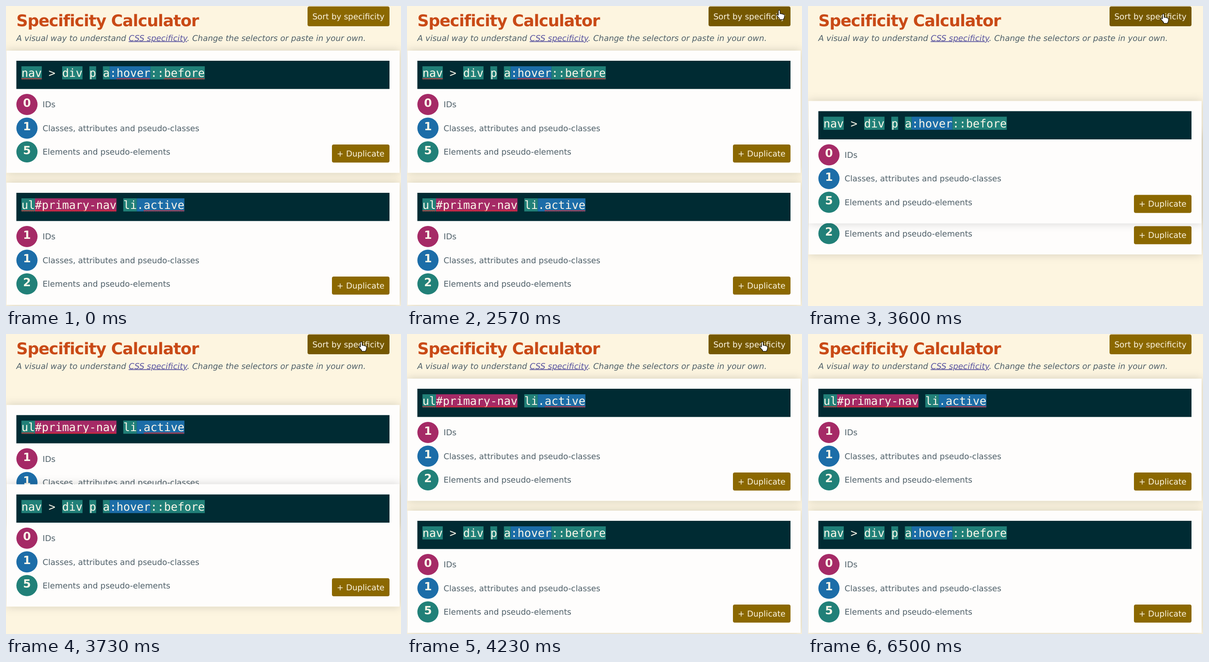
Write an HTML page that moves like this. It is 858x652 px and loops after 6.53 s.

```html
<!DOCTYPE html>
<html lang="en">
<head>
<meta charset="utf-8">
<title>Specificity Calculator</title>
<style>
html, body { margin: 0; width: 100%; height: 100%; overflow: hidden; background: #fdf5e0; }
svg { display: block; }
text { font: 17.5px "DejaVu Sans", sans-serif; fill: #4e5f68; text-rendering: geometricPrecision; white-space: pre; }
.title { font-size: 35px; font-weight: bold; letter-spacing: -.03em; fill: #c94a16; }
.intro { font-style: italic; }
.link { fill: #5a55a0; text-decoration: underline; text-decoration-thickness: 1px; }
.code { font: 24.5px "DejaVu Sans Mono", monospace; fill: #fdf8ea; }
.count { font-size: 24.5px; font-weight: bold; text-anchor: middle; fill: #fdf8ea; }
.button { fill: #8b6800; }
.label { fill: #fdf6e3; }
.squiggle { fill: none; stroke: #e0282c; stroke-width: 1.1; }
</style>
</head>
<body>
<svg width="858" height="652" viewBox="0 0 858 652">
  <defs>
    <filter id="shadow" filterUnits="userSpaceOnUse" x="-50" y="-50" width="960" height="370">
      <feDropShadow dx="0" dy="0" stdDeviation="9.5" flood-color="#30281a" flood-opacity=".17"/>
    </filter>
  </defs>
  <text class="title" x="22.5" y="44">Specificity Calculator</text>
  <text class="intro" x="22.5" y="75.5">A visual way to understand <tspan class="link">CSS specificity</tspan>. Change the selectors or paste in your own.</text>
  <g id="cards"></g>
  <rect id="sort" class="button" x="655" y="1" width="178" height="43" rx="4"/>
  <text class="label" x="665.5" y="28.5">Sort by specificity</text>
  <path id="hand" fill="#fff" stroke="#111" stroke-width="1.2" stroke-linejoin="round"
    d="M-2 1.5Q-2 0 -.2 0Q1.6 0 1.6 1.7V8Q3.2 6.6 4.9 8.3Q6.6 7.4 8 9.2Q11 8.8 11 11.5V14.5Q11 17 9.3 18.5V20.5H.5V18.5Q-2.5 15.5 -5.4 11.6Q-6 9.7 -4.3 9.4Q-3.2 9.5 -2 11.2Z"/>
</svg>
<script>
const LOOP = 6530, TOP = 97, STEP = 287, CHAR = 24.5 * 1233 / 2048;
const MAGENTA = '#a52a66', BLUE = '#1c6da8', GREEN = '#218078';
const $ = id => document.getElementById(id);

const rect = (x, y, w, h, fill, extra = '') =>
  `<rect x="${x}" y="${y}" width="${w}" height="${h}" fill="${fill}" ${extra}/>`;
const text = (cls, x, y, s) => `<text class="${cls}" x="${x}" y="${y}">${s}</text>`;

function squiggle([from, to]) {
  let d = '';
  for (let x = 33.5 + from * CHAR, i = 0; x < 33.5 + to * CHAR; x += 2, i++)
    d += `${i ? 'L' : 'M'}${x} ${i % 2 ? 62 : 60}`;
  return `<path class="squiggle" d="${d}"/>`;
}

// parts: [text, highlight colour]; typos: character ranges
function card(id, parts, counts, typos) {
  let x = 33.5, marks = '';
  for (const [s, color] of parts) {
    if (color) marks += rect(x, 34, s.length * CHAR, 28.5, color);
    x += s.length * CHAR;
  }
  const selector = parts.map(p => p[0]).join('').replace('>', '&gt;');
  const names = ['IDs', 'Classes, attributes and pseudo-classes', 'Elements and pseudo-elements'];
  const rows = names.map((name, i) => {
    const y = 117 + i * 51.5;
    return `<circle cx="45.5" cy="${y}" r="23" fill="${[MAGENTA, BLUE, GREEN][i]}"/>` +
      text('count', 45.5, y + 4.5, counts[i]) + text('', 79.5, y + 6.3, name);
  }).join('');
  return `<g id="${id}">` + rect(1, 0, 854, 265.5, '#fefdfc', 'filter="url(#shadow)"') +
    rect(22.5, 22, 810.5, 61.3, '#002b33') + marks + text('code', 33.5, 57, selector) +
    `<g class="typos">${typos.map(squiggle).join('')}</g>` + rows +
    '<rect class="button" x="708" y="204" width="125" height="39.3" rx="4"/>' +
    text('label', 718.5, 229.8, '+ Duplicate') + '</g>';
}

$('cards').innerHTML =
  card('second', [['ul', GREEN], ['#primary-nav', MAGENTA], [' '], ['li', GREEN], ['.active', BLUE]],
    [1, 1, 2], [[0, 2], [2, 14], [18, 24]]) +
  card('first', [['nav', GREEN], [' > '], ['div', GREEN], [' '], ['p', GREEN], [' '], ['a', GREEN],
    [':hover', BLUE], ['::before', GREEN]], [0, 1, 5], [[0, 3], [14, 19], [21, 27]]);

const typos = document.querySelector('#first .typos');
const clamp = v => Math.min(1, Math.max(0, v));

// cubic-bezier(.25, .1, .25, 1)
function ease(x) {
  let lo = 0, hi = 1;
  const bez = (a, b, s) => 3 * (1 - s) ** 2 * s * a + 3 * (1 - s) * s * s * b + s ** 3;
  for (let i = 0; i < 24; i++) {
    const mid = (lo + hi) / 2;
    if (bez(.25, .25, mid) < x) lo = mid; else hi = mid;
  }
  return bez(.1, 1, lo);
}

// pointer path: time, x, y
const path = [[2400, 866, -4], [2570, 809, 9], [2670, 788, 13], [2900, 772, 17],
  [4700, 772, 17], [4850, 806, -26]];

function pointer(t) {
  const i = path.findIndex(p => p[0] > t);
  if (i < 1) return [-50, -50];
  const [a, b] = [path[i - 1], path[i]], k = (t - a[0]) / (b[0] - a[0]);
  return [a[1] + (b[1] - a[1]) * k, a[2] + (b[2] - a[2]) * k];
}

function draw(now) {
  const t = now % LOOP, start = 3482;
  const shift = STEP * ease(clamp((t - start) / 500));
  $('first').setAttribute('transform', `translate(0 ${TOP + shift})`);
  $('second').setAttribute('transform', `translate(0 ${TOP + STEP - shift})`);
  typos.style.display = t < start ? '' : 'none';
  const [x, y] = pointer(t);
  $('hand').setAttribute('transform', `translate(${x} ${y})`);
  $('sort').style.fill = x > 655 && x < 833 && y > 1 && y < 44 ? '#755800' : '';
  requestAnimationFrame(draw);
}
requestAnimationFrame(draw);
</script>
</body>
</html>
```
